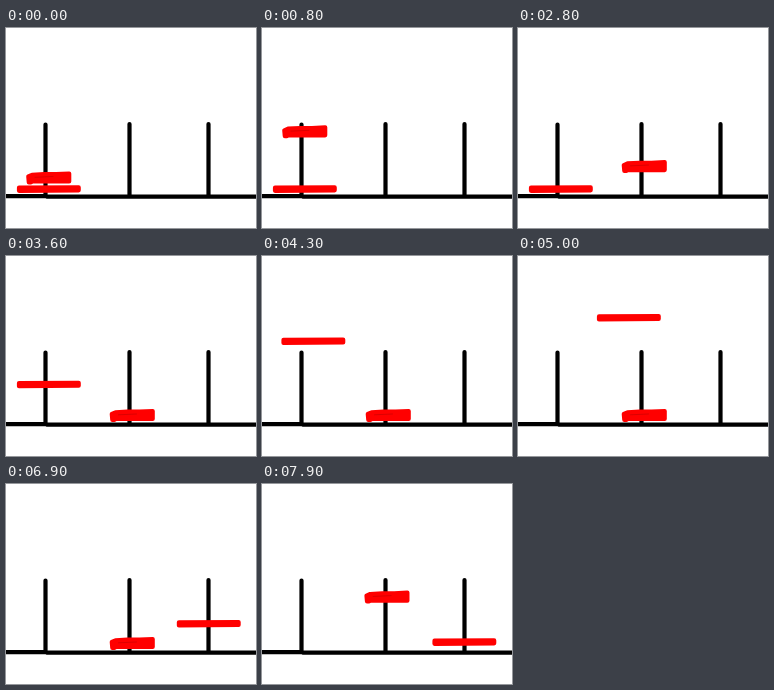
Write an HTML page that moves like this. It is 250 px wide and 200 px high and loops after 8000 ms.

```html
<!DOCTYPE html>
<html lang="en">
<head>
<meta charset="utf-8">
<title>Two-disc tower</title>
<style>
html, body { margin: 0; width: 100%; height: 100%; overflow: hidden; background: #fff; }
svg { display: block; width: 250px; height: 200px; }
path { stroke-width: 4.2; stroke-linecap: round; stroke-linejoin: round; }
.ink { fill: none; stroke: #000; }
.disc { fill: #f00; stroke: #f00; }
.disc + path { fill: none; stroke: #d40000; stroke-width: .8; }
</style>
</head>
<body>
<svg viewBox="0 0 250 200">
  <path class="ink" d="M-3 168.1H40L41 168.6H253M39.5 96.5V168M123.5 96V168M202.5 96V168"/>
  <path id="large" class="disc" d="M3 3.2L62.7 2.9V5.8L3 6.3Z"/>
  <g id="small">
    <path class="disc" d="M2.3 5L6 3.4L18 2.7H30L43.2 2V10H6L5 10.8H2.8Z"/>
    <path d="M9 5.8L27 5"/>
  </g>
</svg>
<script>
const LOOP = 8000, STEP = 100;

// Turning points of each carry: rest, lift, peak, over the peg, landed
const small = [
  { t: 0, x: 20, y: 143.5 },
  { t: 1100, x: 20, y: 80 },
  { t: 1450, x: 51, y: 53.5 },
  { t: 2000, x: 103.5, y: 78 },
  { t: 3110, x: 103.5, y: 153 },
  { t: 7200, x: 103.5, y: 153 },
  { t: LOOP, x: 102, y: 100 }
];
const large = [
  { t: 0, x: 10, y: 156.5 },
  { t: 3110, x: 10, y: 156.5 },
  { t: 4200, x: 10, y: 84 },
  { t: 5200, x: 95, y: 50.5 },
  { t: 6100, x: 171, y: 86 },
  { t: 7200, x: 169.5, y: 153.5 },
  { t: LOOP, x: 169.5, y: 153.5 }
];

function move(id, points, t) {
  const i = points.findIndex(p => p.t > t), a = points[i - 1], b = points[i];
  const mix = key => a[key] + (b[key] - a[key]) * (t - a.t) / (b.t - a.t);
  document.getElementById(id).setAttribute("transform", `translate(${mix("x")} ${mix("y")})`);
}

const start = performance.now();
function draw() {
  const t = Math.floor((performance.now() - start) % LOOP / STEP) * STEP;
  move("small", small, t);
  move("large", large, t);
  requestAnimationFrame(draw);
}
draw();
</script>
</body>
</html>
```
